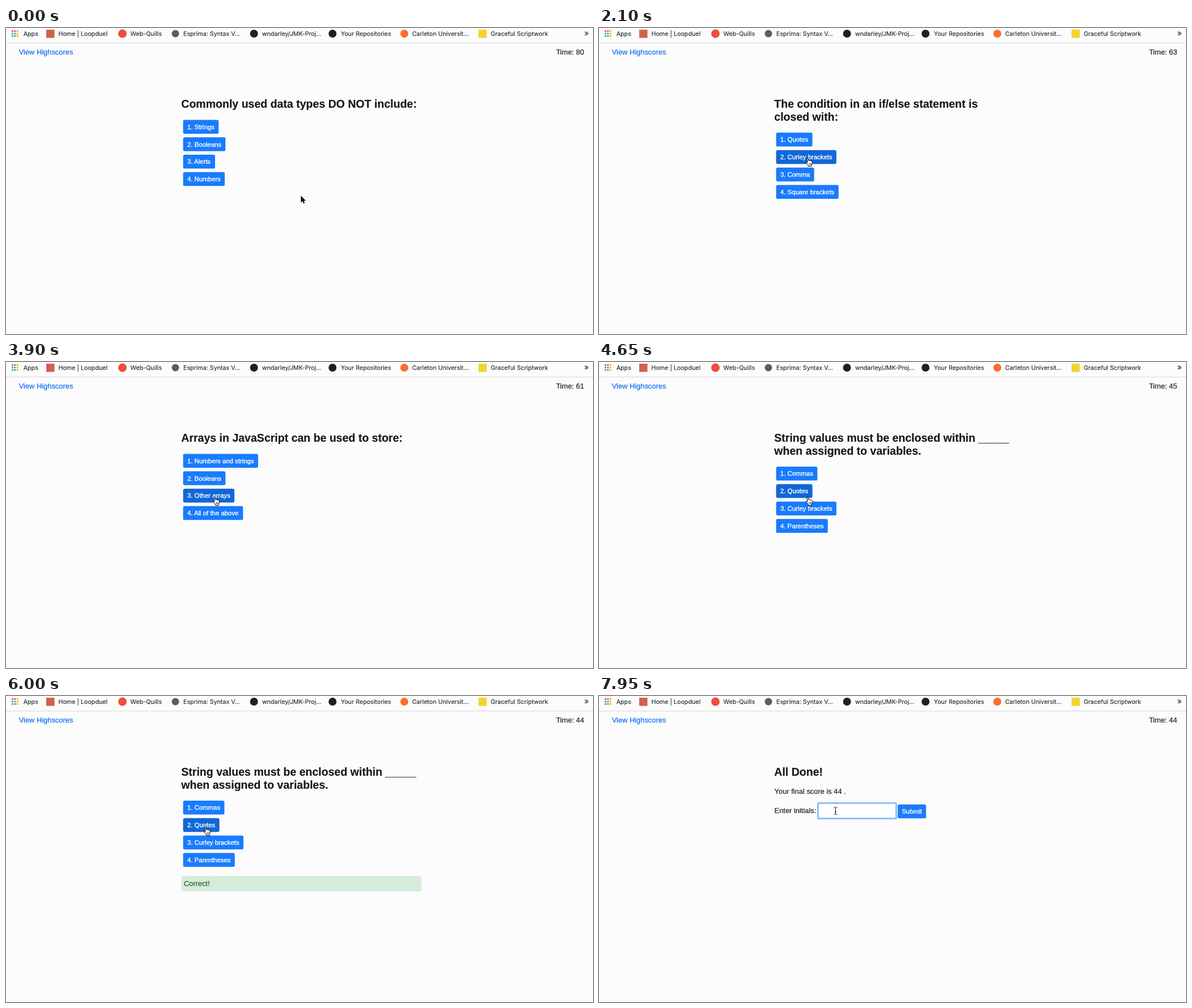
These frames come from a looping animation (1036 by 541 pixels, 8000 ms). An HTML page:

```html
<!DOCTYPE html>
<html lang="en">
<head>
<meta charset="utf-8">
<title>Code quiz</title>
<style>
  html, body { margin: 0; width: 100%; height: 100%; overflow: hidden; background: #fcfcfc; }
  svg { display: block; width: 1036px; height: 541px; }
  text { font: 12.88px "Liberation Sans", Arial, sans-serif; fill: #15181b; stroke: #15181b; stroke-width: .15; }
  .bar text { font: 10.7px Inter, sans-serif; fill: #2b2c2e; stroke: #2b2c2e; }
  .bar .more { font-size: 14px; }
  .head { font-size: 19.55px; font-weight: bold; }
  .btn { font-size: 11.4px; fill: #fff; stroke: #fff; stroke-width: .35; }
  .link { fill: #0766f5; stroke: #0766f5; }
  .good { fill: #1f5428; stroke: #1f5428; }
  .bad { fill: #5e1c22; stroke: #5e1c22; }
</style>
</head>
<body>
<svg viewBox="0 0 1036 541">
  <g class="bar" id="bar"></g>
  <path d="M0 26.5H1036" stroke="#d6d6d6"/>
  <text class="link" x="22.7" y="47">View Highscores</text>
  <g id="page"></g>
</svg>
<script>
const LOOP = 8000, STEP = 150;
const BLUE = '#197bfe', DARK = '#1067d9', EDGE = '#0f5fc8';

const screens = [
  { at: 0, title: ['Commonly used data types DO NOT include:'],
    options: ['Strings', 'Booleans', 'Alerts', 'Numbers'] },
  { at: 1350, title: ['The condition in an if/else statement is', 'closed with:'],
    options: ['Quotes', 'Curley brackets', 'Comma', 'Square brackets'] },
  { at: 3000, title: ['Arrays in JavaScript can be used to store:'],
    options: ['Numbers and strings', 'Booleans', 'Other arrays', 'All of the above'] },
  { at: 4650, title: ['String values must be enclosed within _____', 'when assigned to variables.'],
    options: ['Commas', 'Quotes', 'Curley brackets', 'Parentheses'] },
  { at: 6300, title: ['All Done!'], options: [] }
];
const answers = [
  { at: 900, right: false }, { at: 2550, right: true },
  { at: 4200, right: false }, { at: 5850, right: true }
];
const ticks = [600, 1650, 2700, 3600, 4650, 5700];
const FEEDBACK_TIME = 450, PENALTY = 15;

// pointer hotspot: time, x, y
const path = [
  [0, 520.5, 296.5], [750, 350, 171], [1800, 350, 171], [2100, 368, 230],
  [3450, 368, 230], [3600, 354, 243], [3750, 353, 247], [3900, 368, 239],
  [4650, 368, 239], [4950, 353, 238], [5250, 353, 238], [5400, 352, 232],
  [6750, 352, 232], [7050, 417.5, 203]
];

const pen = document.createElement('canvas').getContext('2d');
pen.font = '11.4px "Liberation Sans", Arial, sans-serif';

const text = (x, y, str, cls = '') => `<text class="${cls}" x="${x}" y="${y}">${str}</text>`;
const rect = (x, y, w, h, fill, r = 0, more = '') =>
  `<rect x="${x}" y="${y}" width="${w}" height="${h}" rx="${r}" fill="${fill}" ${more}/>`;
const dot = (x, y, r, fill) => `<circle cx="${x}" cy="${y}" r="${r}" fill="${fill}"/>`;
const inside = (p, b) => p.x >= b.x && p.x <= b.x + b.w && p.y >= b.y && p.y <= b.y + b.h;

function drawBar() {
  const colors = ['#ea4335', '#ea4335', '#f5a623', '#34a853', '#4285f4', '#f5a623',
                  '#34a853', '#34a853', '#f5a623'];
  const apps = colors.map((c, i) =>
    rect(10 + i % 3 * 4.4, 4 + Math.floor(i / 3) * 4.4, 2.8, 2.8, c, .5)).join('');
  const icons = rect(71, 3, 14.5, 14.5, '#d2604f') + dot(205.5, 10, 7.5, '#ee4d3f') +
    dot(299, 10, 6.5, '#5a5d61') + dot(437.7, 10, 7, '#1d2125') + dot(576.3, 10, 7, '#1d2125') +
    dot(703, 10, 7, '#f8702c') + rect(834, 3, 14.5, 14.5, '#efd52e');
  const labels = [[30.7, 'Apps'], [92.5, 'Home | Loopduel'], [219.5, 'Web-Quills'],
    [313, 'Esprima: Syntax V...'], [452, 'wndarley/JMK-Proj...'], [591, 'Your Repositories'],
    [716.8, 'Carleton Universit...'], [855.5, 'Graceful Scriptwork']];
  return apps + icons + labels.map(([x, s]) => text(x, 13.8, s)).join('') +
    text(1020.5, 14.3, '»', 'more');
}

function pointerAt(t) {
  const i = path.findIndex(k => k[0] > t);
  if (i < 0) return { x: path.at(-1)[1], y: path.at(-1)[2] };
  const [t0, x0, y0] = path[i - 1], [t1, x1, y1] = path[i];
  const u = (t - t0) / (t1 - t0), e = u * u * (3 - 2 * u);
  return { x: x0 + (x1 - x0) * e, y: y0 + (y1 - y0) * e };
}

function button(b, hot, fill = BLUE) {
  const rim = hot ? `stroke="${EDGE}" stroke-width=".8"` : '';
  const d = hot ? .4 : 0;
  return rect(b.x + d, b.y + d, b.w - 2 * d, b.h - 2 * d, fill, 2.6, rim) +
    text(b.x + 7.3, b.y + 16.3, b.label, 'btn');
}

function box(label, x, y) {
  return { label, x, y, w: pen.measureText(label).width + 14.6, h: 24.5 };
}

function pointer(p, kind) {
  const shapes = {
    arrow: `<path d="M0 0V12.2L2.8 9.6L4.7 14L6.7 13.1L4.9 8.9H8.6Z"
      fill="#000" stroke="#fff" stroke-width="1" paint-order="stroke"/>`,
    hand: `<path d="M-1 1.2C-1.2-.7 1-.8 1.2.8L1.8 4.5C2.2 3.4 3.8 3.6 4 4.8C4.6 4 5.9 4.3 6.1 5.4
      C6.8 4.8 8.2 5.2 8.3 6.6V9.5C8.3 11.5 7 12.2 7 14.5H1.8C1.5 12.5-.8 10.5-2.3 8.2
      C-2.8 7.2-1.6 6.4-.6 7.6L0 8.2Z" fill="#fff" stroke="#000" stroke-width="1"/>
      <path d="M2.8 9V12.3M4.5 9V12.3M6.2 9V12.3" stroke="#000" stroke-width=".7"/>`,
    beam: `<path d="M-3-6.5Q0-6.5 0-4.5Q0-6.5 3-6.5M0-5V5M-3 6.5Q0 6.5 0 4.5Q0 6.5 3 6.5M-1.5 2H1.5"
      fill="none" stroke="#111" stroke-width="1"/>`
  };
  return `<g transform="translate(${p.x} ${p.y})">${shapes[kind]}</g>`;
}

function drawPage(t) {
  const index = screens.findLastIndex(s => s.at <= t);
  const { title, options } = screens[index];
  const p = pointerAt(t);
  const shift = (title.length - 1) * 22.7;
  const score = 80 - ticks.filter(k => k <= t).length -
    PENALTY * answers.filter(a => !a.right && a.at <= t).length;
  let kind = 'arrow';
  let out = text(970.7, 47, 'Time: ' + score) +
    title.map((line, i) => text(309.3, 141.3 + i * 22.7, line, 'head')).join('');

  options.forEach((option, i) => {
    const b = box(`${i + 1}. ${option}`, 312.6, 162.4 + shift + i * 30.8);
    const hot = inside(p, b);
    if (hot) kind = 'hand';
    out += button(b, hot, hot && index ? DARK : BLUE);
  });

  const answer = answers.find(a => t >= a.at && t < a.at + FEEDBACK_TIME);
  if (answer) {
    const [label, fill, cls] = answer.right
      ? ['Correct!', '#d6ecda', 'good'] : ['Wrong!', '#f8d6d9', 'bad'];
    out += rect(309.7, 295.7 + shift, 423.6, 27, fill, 3.2) +
      text(313.7, 313 + shift, label, cls);
  }

  if (!options.length) {
    const field = { x: 387.5, y: 191.5, w: 135.5, h: 23.5 };
    const focused = t >= 7350;
    out += text(309.6, 173, `Your final score is ${score} .`) +
      text(309.6, 207, 'Enter initials:') +
      rect(field.x, field.y, field.w, field.h, '#fff', 0, 'stroke="#c6c6c6"');
    if (focused) out += rect(386.4, 189.4, 138.2, 27.2, '#fff', 1.2, 'stroke="#87bcf6" stroke-width="2.8"');
    if (focused && t < 7950) out += rect(390, 196, 1, 14, '#222');
    out += button(box('Submit', 527.2, 191.8), false);
    if (inside(p, field)) kind = 'beam';
  }
  return out + pointer(p, kind);
}

const page = document.getElementById('page');
document.getElementById('bar').innerHTML = drawBar();
const start = performance.now();
let shown = -1;
function frame() {
  const t = Math.floor((performance.now() - start) % LOOP / STEP) * STEP;
  if (t !== shown) page.innerHTML = drawPage(shown = t);
  requestAnimationFrame(frame);
}
frame();
</script>
</body>
</html>
```
